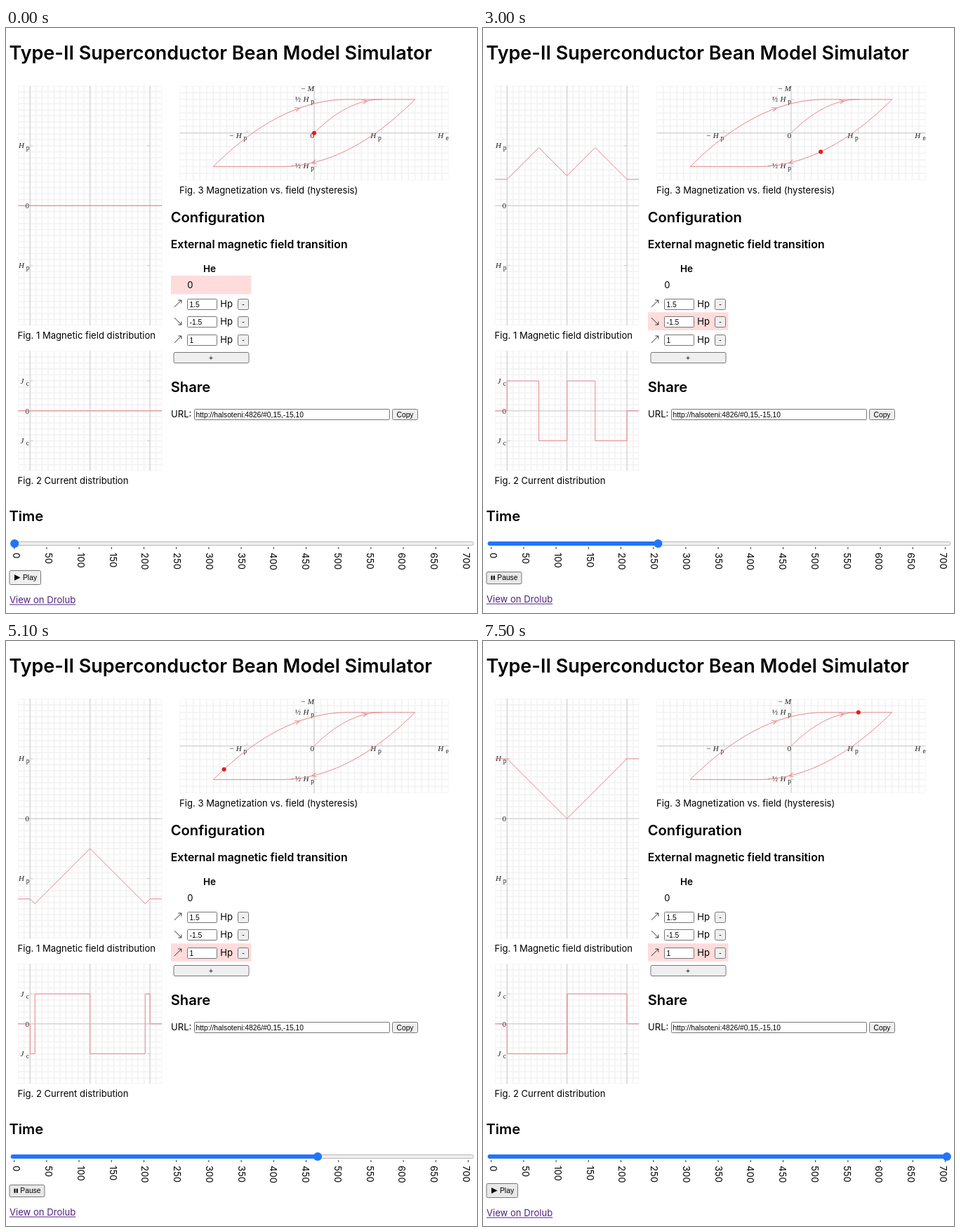
An HTML page with a canvas that plays this animation: 671x834 px, repeating every 7600 ms.

```html
<!DOCTYPE html>
<html lang="en">
<head>
<meta charset="utf-8">
<title>Type-II Superconductor Bean Model Simulator</title>
<style>
html, body { margin: 0; width: 100%; height: 100%; overflow: hidden; background: #fff; }
canvas { display: block; width: 671px; height: 834px; }
</style>
</head>
<body>
<canvas id="stage"></canvas>
<script>
const W = 671, H = 834, LOOP = 7600, STEP = 100;
const SANS = 'Inter, "Open Sans", sans-serif';
const UI = '"Liberation Sans", Arial, sans-serif';
const SERIF = '"Liberation Serif", "Times New Roman", serif';
const RED = '#e8858b', AXIS = '#c9c9c9', BLUE = '#2175fb';

const canvas = document.getElementById('stage');
const ctx = canvas.getContext('2d');
const dpr = window.devicePixelRatio || 1;
canvas.width = W * dpr;
canvas.height = H * dpr;

function text(str, x, y, font, color = '#000', align = 'left') {
  ctx.font = font;
  ctx.fillStyle = color;
  ctx.textAlign = align;
  ctx.fillText(str, x, y);
}
const body = (str, x, y) => text(str, x, y, `13.1px ${SANS}`);
const bold = (str, x, y, size) => text(str, x, y, `600 ${size}px ${SANS}`);
const ui = (str, x, y, align) => text(str, x, y, `10.3px ${UI}`, '#000', align);

function line(points, color, width = 1) {
  ctx.beginPath();
  points.forEach(([x, y]) => ctx.lineTo(x, y));
  ctx.strokeStyle = color;
  ctx.lineWidth = width;
  ctx.stroke();
}

function box(x, y, w, h, fill, border, r) {
  ctx.beginPath();
  ctx.roundRect(x + 0.5, y + 0.5, w - 1, h - 1, r);
  ctx.fillStyle = fill;
  ctx.fill();
  ctx.strokeStyle = border;
  ctx.lineWidth = 1;
  ctx.stroke();
}
const button = (x, y, w, h, fill = '#efefef') => box(x, y, w, h, fill, '#767676', 2);
const field = (x, y, w, h) => box(x, y, w, h, '#fff', '#767676', 1);

function dot(x, y, r, color) {
  ctx.beginPath();
  ctx.arc(x, y, r, 0, Math.PI * 2);
  ctx.fillStyle = color;
  ctx.fill();
}

// Axis label right-aligned at x: prefix, italic symbol, lowered index
function label(pre, sym, sub, x, y) {
  const small = `9.5px ${SERIF}`, italic = `italic 11px ${SERIF}`;
  if (sub) {
    text(sub, x, y + 3, small, '#222', 'right');
    x -= 7.5;
  }
  text(sym, x, y, italic, '#222', 'right');
  text(pre, x - ctx.measureText(sym).width - 3.5, y, `11px ${SERIF}`, '#222', 'right');
}
const zero = (x, y) => text('0', x, y, `11px ${SERIF}`, '#222', 'right');

function clip(x, y, w, h, draw) {
  ctx.save();
  ctx.beginPath();
  ctx.rect(x, y, w, h);
  ctx.clip();
  draw();
  ctx.restore();
}

function grid(x, y, cols, rows, cell) {
  const w = cols * cell, h = rows * cell;
  clip(x, y, w, h, () => {
    for (let i = 0; i <= cols; i++) line([[x + i * cell, y], [x + i * cell, y + h]], '#f2f2f2', 1.5);
    for (let j = 0; j <= rows; j++) line([[x, y + j * cell], [x + w, y + j * cell]], '#f2f2f2', 1.5);
  });
}

// ---- model, in units of Hp ----
const phaseAt = v => v <= 0 ? 0 : v <= 150 ? 1 : v <= 450 ? 2 : 3;
const fieldAt = v => v <= 150 ? v / 100 : v <= 450 ? (300 - v) / 100 : (v - 600) / 100;

function magnet(phase, h) {
  if (phase < 2) return h < 1 ? h - h * h / 2 : 0.5;
  const d = Math.min(2, phase === 2 ? 1.5 - h : h + 1.5);
  const m = 0.5 - d + d * d / 4;
  return phase === 2 ? m : -m;
}

// Depth reached by the newest front
const frontAt = (phase, h) => Math.min(1, phase < 2 ? h : phase === 2 ? (1.5 - h) / 2 : (h + 1.5) / 2);

function inside(phase, h, s) {
  if (phase < 2) return Math.max(0, h - s);
  return phase === 2 ? Math.min(1.5 - s, h + s) : Math.max(s - 1.5, h - s);
}

// ---- figures ----
const U = 85.4, LEFT = 34.3, MID = LEFT + U, RIGHT = MID + U, X0 = 17.2, X1 = 222.2;

function slabAxes(top, rows, y0, tick) {
  grid(X0, top, 24, rows, U / 10);
  const bottom = top + rows * U / 10;
  for (const x of [LEFT, MID, RIGHT]) line([[x, top], [x, bottom]], AXIS);
  line([[X0, y0], [X1, y0]], AXIS);
  for (const y of [y0 - tick, y0 + tick]) {
    line([[LEFT, y], [LEFT + 4, y]], AXIS);
    line([[RIGHT - 4, y], [RIGHT, y]], AXIS);
  }
}

function fieldFigure(phase, h) {
  const y0 = 253.3, d = frontAt(phase, h);
  slabAxes(82.5, 40, y0, U);
  clip(17, 82, 206, 343, () => {
    label('', 'H', 'p', 33.5, y0 - U + 3.5);
    label('−', 'H', 'p', 33.5, y0 + U + 3.5);
    zero(33, y0 + 3.7);
  });
  const depths = [0, d, 1];
  const y = s => y0 - U * inside(phase, h, s);
  line([
    [X0, y(0)],
    ...depths.map(s => [LEFT + U * s, y(s)]),
    ...depths.reverse().map(s => [RIGHT - U * s, y(s)]),
    [X1, y(0)]
  ], RED);
}

function currentFigure(phase, h) {
  const y0 = 545.8, J = U / 2, d = frontAt(phase, h) * U;
  slabAxes(460.4, 20, y0, J);
  clip(17, 460, 206, 172, () => {
    label('', 'J', 'c', 33, y0 - J + 3.5);
    label('−', 'J', 'c', 33, y0 + J + 3.5);
    zero(33, y0 + 3.7);
  });
  const outer = phase === 0 ? 0 : phase === 2 ? -J : J;
  const inner = phase < 2 ? 0 : -outer;
  const a = y0 + outer, b = y0 + inner, c = y0 - inner, e = y0 - outer;
  line([
    [X0, y0], [LEFT, y0], [LEFT, a], [LEFT + d, a], [LEFT + d, b], [MID, b],
    [MID, c], [RIGHT - d, c], [RIGHT - d, e], [RIGHT, e], [RIGHT, y0], [X1, y0]
  ], RED);
}

function loopFigure(phase, h) {
  const S = 95.8, cx = 439, cy = 149.7, x0 = cx - 2 * S, x1 = cx + 2 * S, y0 = cy - 0.7 * S, y1 = cy + 0.7 * S;
  const at = (p, q) => [cx + S * q, cy - S * magnet(p, q)];
  grid(x0, y0, 40, 14, S / 10);
  line([[x0, cy], [x1, cy]], AXIS);
  line([[cx, y0], [cx, y1]], AXIS);
  for (const s of [-S, S]) {
    line([[cx + s, cy - 4], [cx + s, cy]], AXIS);
    line([[cx, cy + s / 2], [cx + 4, cy + s / 2]], AXIS);
  }
  label('−', 'M', '', cx, 90);
  label('½', 'H', 'p', cx, 104.8);
  label('−½', 'H', 'p', cx, 200.4);
  label('−', 'H', 'p', cx - S, 157);
  label('', 'H', 'p', cx + S, 157);
  label('', 'H', 'e', x1, 157);
  zero(cx, 157);

  for (const [p, from, to] of [[1, 0, 1.5], [2, 1.5, -1.5], [3, -1.5, 1]]) {
    const pts = [];
    for (let i = 0; i <= 80; i++) pts.push(at(p, from + (to - from) * i / 80));
    line(pts, RED);
    const mid = (from + to) / 2, dir = Math.sign(to - from) * 0.02;
    const [ax, ay] = at(p, mid), [bx, by] = at(p, mid + dir);
    ctx.save();
    ctx.translate(ax, ay);
    ctx.rotate(Math.atan2(by - ay, bx - ax));
    line([[-3, -3], [3.5, 0], [-3, 3]], RED);
    ctx.restore();
  }
  const [x, y] = at(phase, h);
  dot(x, y, 3, '#f01414');
}

// ---- page parts ----
function table(phase) {
  bold('He', 281, 347.7, 13.5);
  ctx.fillStyle = '#ffdcdc';
  ctx.fillRect(235, [353, 379.6, 405.3, 431.2][phase], 114.3, phase ? 25.6 : 26.4);
  body('0', 258.3, 371);
  ['1.5', '-1.5', '1'].forEach((value, i) => {
    const y = Math.floor(386 + i * 25.6), up = i !== 1;
    const ay = s => y + 7 + (up ? -s : s) * 5;
    line([[239.8, ay(-1)], [249.8, ay(1)]], '#000', 0.8);
    line([[245.3, ay(1)], [249.8, ay(1)], [249.8, ay(0.1)]], '#000', 0.8);
    field(258, y, 43, 16);
    ui(value, 261.5, y + 11.5);
    body('Hp', 305.3, y + 11.5);
    button(330, y, 16, 16);
    ui('-', 338, y + 11.2, 'center');
  });
  button(238.5, 462, 108, 16);
  ui('+', 292, 473.8, 'center');
}

function slider(v) {
  const x = 12.2 + 648.6 * v / 700;
  box(6.7, 732, 659.8, 6, '#efefef', '#b8b8b8', 3);
  ctx.beginPath();
  ctx.roundRect(6.7, 732, x - 6.7, 6, 3);
  ctx.fillStyle = BLUE;
  ctx.fill();
  dot(x, 735, 6.1, BLUE);
  for (let k = 0; k <= 14; k++) {
    const tx = 11.7 + 46.2 * k;
    line([[tx, 740], [tx, 743]], '#333');
    ctx.save();
    ctx.translate(15 + 45.75 * k, 748);
    ctx.rotate(Math.PI / 2);
    body(String(k * 50), 0, 4.7);
    ctx.restore();
  }
}

function controls(t) {
  const playing = t >= 500 && t < 7500;
  const fill = t < 100 ? '#efefef' : t >= 300 && t < 500 ? '#f5f5f5' : '#e8e8e8';
  if (playing) {
    button(4.5, 775, 51, 18, fill);
    ctx.fillStyle = '#000';
    ctx.fillRect(11.5, 780.8, 2, 6);
    ctx.fillRect(14.8, 780.8, 2, 6);
    ui('Pause', 20.3, 787.4);
  } else {
    button(4.5, 773, 45.5, 21, fill);
    ctx.fillStyle = '#000';
    ctx.beginPath();
    ctx.moveTo(12, 779.3);
    ctx.lineTo(20.5, 783.5);
    ctx.lineTo(12, 787.7);
    ctx.fill();
    ui('Play', 24, 787.4);
  }
  const y = playing ? 819 : 820, link = 'View on Drolub';
  text(link, 5, y, `13.1px ${SANS}`, '#4f2180');
  ctx.fillRect(5, y + 1.5, ctx.measureText(link).width, 1);
}

function draw(t) {
  const v = t < 500 ? 0 : Math.min(700, (t - 440) / 10);
  const phase = phaseAt(v), h = fieldAt(v);
  ctx.setTransform(dpr, 0, 0, dpr, 0, 0);
  ctx.fillStyle = '#fff';
  ctx.fillRect(0, 0, W, H);

  bold('Type-II Superconductor Bean Model Simulator', 4.5, 44.5, 27);
  fieldFigure(phase, h);
  body('Fig. 1 Magnetic field distribution', 16.5, 443);
  currentFigure(phase, h);
  body('Fig. 2 Current distribution', 16.5, 650);
  loopFigure(phase, h);
  body('Fig. 3 Magnetization vs. field (hysteresis)', 247, 236);

  bold('Configuration', 234.7, 277, 20.2);
  bold('External magnetic field transition', 234.7, 313.7, 15.8);
  table(phase);
  bold('Share', 234.7, 518.5, 20.2);
  body('URL:', 235, 555);
  field(268, 543, 279, 16);
  ui('http://halsoteni:4826/#0,15,-15,10', 270.5, 554.6);
  button(550, 543, 37, 16);
  ui('Copy', 568.5, 554.6, 'center');

  bold('Time', 4.5, 703, 20.2);
  slider(v);
  controls(t);
}

const start = performance.now();
let last = -1;
function tick() {
  const now = Math.max(0, performance.now() - start) % LOOP;
  const t = Math.floor(now / STEP) * STEP;
  if (t !== last) draw(last = t);
  requestAnimationFrame(tick);
}
tick();
</script>
</body>
</html>
```
